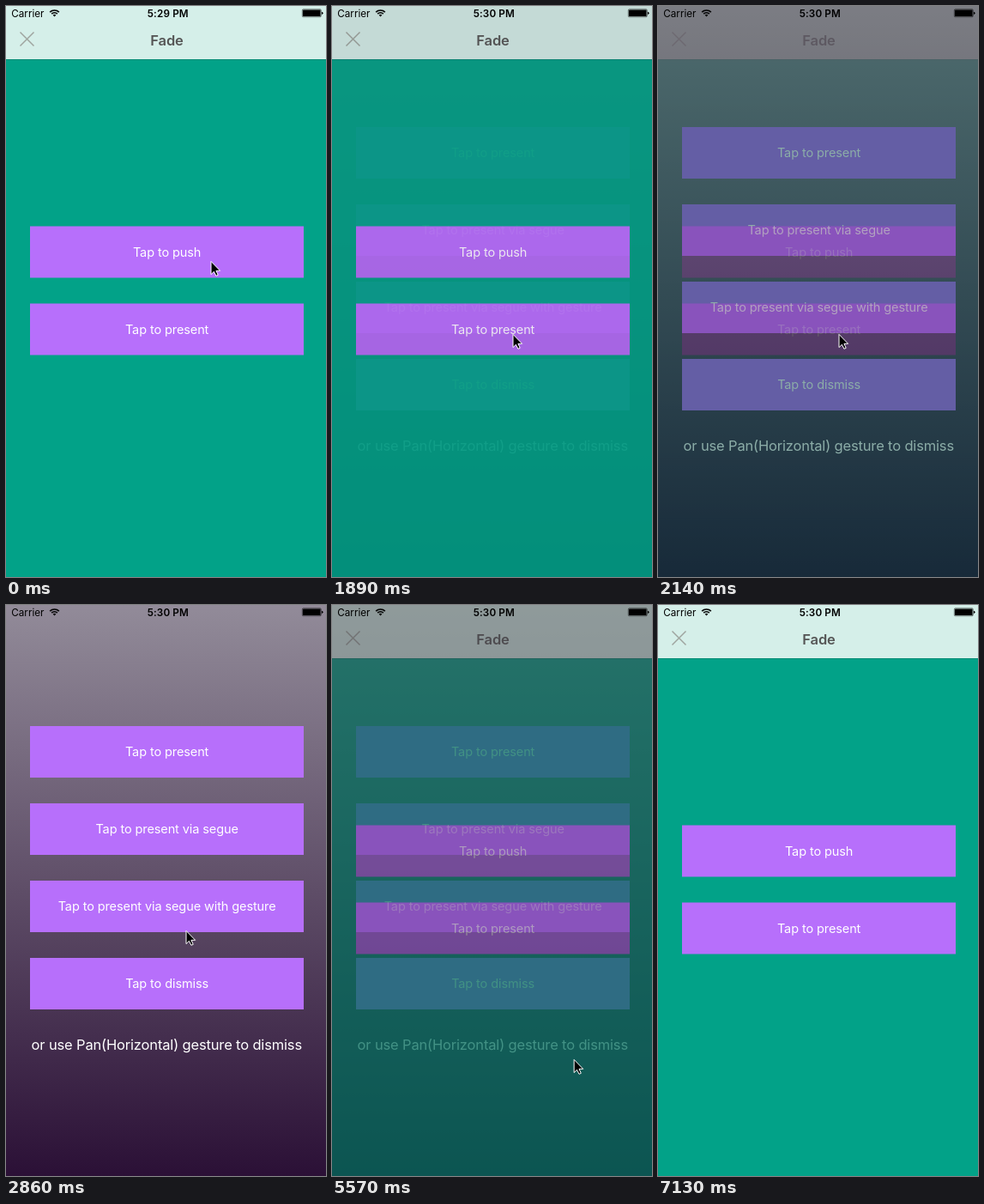
Recreate the animation shown at these times as an HTML page. Size 373 px wide and 665 px high, loop 7910 ms.

```html
<!DOCTYPE html>
<html lang="en">
<head>
<meta charset="utf-8">
<title>Fade transition</title>
<style>
  html, body { margin: 0; width: 100%; height: 100%; overflow: hidden; background: #000; }
  svg { display: block; width: 373px; height: 665px; font-family: Inter, sans-serif; }
  text { text-anchor: middle; }
  .button rect { fill: #b76ffb; }
  .button text { fill: #fff; font-size: 14.5px; letter-spacing: -.1px; }
</style>
</head>
<body>
<svg viewBox="0 0 373 665">
  <defs>
    <linearGradient id="dusk" x2="0" y2="1">
      <stop stop-color="#928b99"/>
      <stop offset="1" stop-color="#2b1036"/>
    </linearGradient>
  </defs>
  <g id="layers">
    <g id="modal">
      <rect width="373" height="665" fill="url(#dusk)"/>
      <text x="187.3" y="517.5" fill="#fff" font-size="16.5" letter-spacing="-.155">or use Pan(Horizontal) gesture to dismiss</text>
    </g>
    <g id="home">
      <rect width="373" height="665" fill="#02a288"/>
      <rect width="373" height="62" fill="#d5efe9"/>
      <rect y="62" width="373" height=".5" opacity=".3"/>
      <path d="M16.5 30.5l16 16m0-16l-16 16" stroke="#9fa59f" stroke-width="1.5"/>
      <text x="187.5" y="46" fill="#555" font-size="16.5" font-weight="600" letter-spacing="-.1">Fade</text>
    </g>
  </g>
  <g font-size="11.7">
    <text x="25.4" y="12.6">Carrier</text>
    <text id="clock" x="188.8" y="12.6" font-weight="600" letter-spacing=".15"></text>
    <path d="M51.2 7.2a7.5 7.5 0 0 1 10.6 0M53.2 9.2a4.7 4.7 0 0 1 6.6 0" fill="none" stroke="#000" stroke-width="1.7"/>
    <path d="M56.5 12.5l-1.8-1.9a2.6 2.6 0 0 1 3.6 0z"/>
    <rect x="345.3" y="3.8" width="22" height="9" rx="1.3" fill="none" stroke="#000" stroke-width=".5"/>
    <rect x="346" y="4.5" width="20.6" height="7.6" rx=".6"/>
    <path d="M368 6.7q1.5.2 1.5 1.6t-1.5 1.6z"/>
  </g>
  <path id="cursor" d="M1 1.4V16.6L4.4 13.3L6.9 18.3L9.2 17.3L6.9 12.3H11.6Z" stroke="#fff"/>
</svg>
<script>
const LOOP = 7910, MINUTE = 360, PRESENT = 1772, FADE = 700;
const GRAB = 4370, RELEASE = 6040, SETTLE = 260;

const [layers, home, modal, clock, cursor] =
  ['layers', 'home', 'modal', 'clock', 'cursor'].map(id => document.getElementById(id));

function addButtons(layer, top, labels) {
  labels.forEach((label, i) => layer.insertAdjacentHTML('beforeend',
    `<g class="button" transform="translate(28 ${top + 90 * i})">
      <rect width="319" height="60"/><text x="159.6" y="35.4">${label}</text></g>`));
}
addButtons(home, 256.5, ['Tap to push', 'Tap to present']);
addButtons(modal, 141, ['Tap to present', 'Tap to present via segue',
  'Tap to present via segue with gesture', 'Tap to dismiss']);

// Cursor moves: start, end, and where it comes to rest
const rest = { x: 238, y: 296 };
const moves = [
  [310, 470, 227, 288],
  [780, 1010, 214, 354],
  [1260, 1480, 210, 381],
  [2800, 2860, 209, 378],
  [2900, 3650, 138, 434],
  [3780, 4060, 62, 532],
  [GRAB, 5570, 281, 528],
  [5570, 6250, 342, 535],
  [6740, 6840, 337, 542],
  [6970, 7130, 375, 668]
];

const clamp = v => Math.min(1, Math.max(0, v));
const mix = (a, b, k) => a + (b - a) * k;
const easeOut = k => 1 - (1 - k) ** 1.4;

function cursorAt(t) {
  let { x, y } = rest;
  for (const [start, end, toX, toY] of moves) {
    const k = easeOut(clamp((t - start) / (end - start)));
    x = mix(x, toX, k);
    y = mix(y, toY, k);
  }
  return { x, y };
}

// cubic-bezier(.42, 0, .58, 1), solved by bisection
function easeInOut(x) {
  let lo = 0, hi = 1;
  for (let i = 0; i < 20; i++) {
    const u = (lo + hi) / 2, v = 1 - u;
    if (1.26 * u * v * v + 1.74 * u * u * v + u * u * u < x) lo = u; else hi = u;
  }
  return lo * lo * (3 - 2 * lo);
}

// The incoming layer fades in on top while the outgoing one fades out.
function crossfade(from, to, progress) {
  if (layers.firstElementChild !== from) layers.prepend(from);
  const a = easeInOut(clamp(progress));
  to.setAttribute('opacity', a);
  from.setAttribute('opacity', 1 - a);
}

// The pan drives the dismissal until release, then it runs to the end.
function dismissal(t) {
  const dragged = (cursorAt(Math.min(t, RELEASE)).x - 95) / 373;
  return mix(dragged, 1, clamp((t - RELEASE) / SETTLE));
}

function draw(t) {
  const { x, y } = cursorAt(t);
  cursor.setAttribute('transform', `translate(${x} ${y})`);
  clock.textContent = t < MINUTE ? '5:29 PM' : '5:30 PM';
  if (t < GRAB) crossfade(home, modal, (t - PRESENT) / FADE);
  else crossfade(modal, home, dismissal(t));
}

function tick() {
  draw(performance.now() % LOOP);
  requestAnimationFrame(tick);
}
tick();
</script>
</body>
</html>
```
